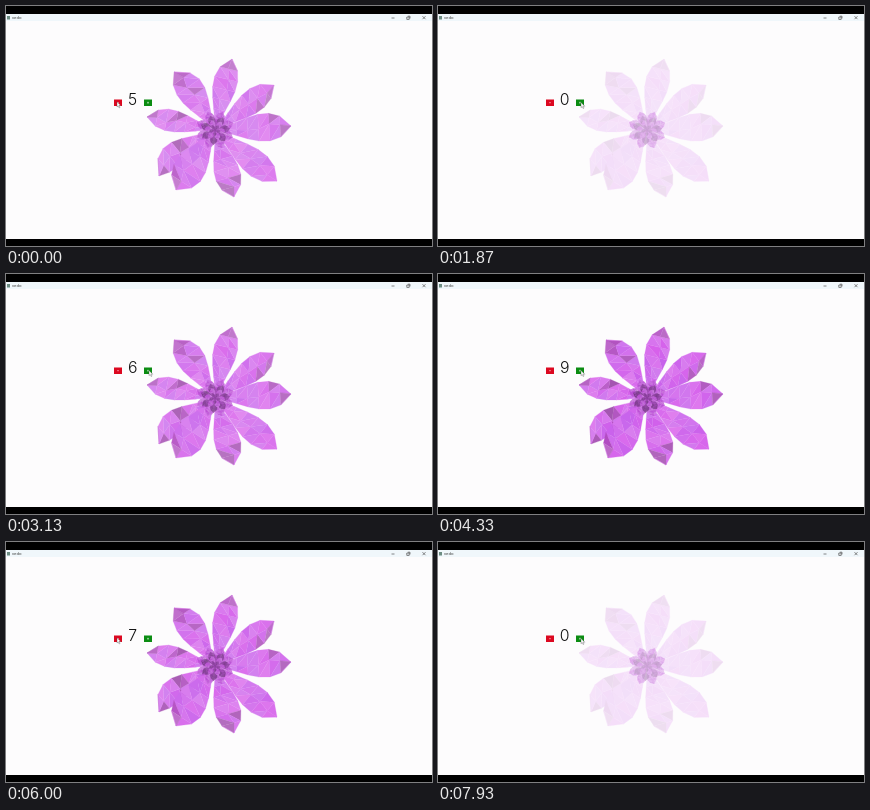
Animation of 426x240 px, one loop 8000 ms. Source, as an HTML page:

```html
<!DOCTYPE html>
<html lang="en">
<head>
<meta charset="utf-8">
<title>Flower opacity</title>
<style>
  html, body { margin: 0; width: 100%; height: 100%; overflow: hidden; background: #000; }
  svg { display: block; width: 100vw; height: 100vh; }
</style>
</head>
<body>
<svg viewBox="0 0 426 240">
  <rect width="426" height="240"/>
  <rect y="8" width="426" height="225" fill="#fdfcfd"/>
  <rect y="8" width="426" height="7" fill="#f0f7fb"/>
  <rect x="1" y="10" width="3" height="3.5" fill="#6d8d83"/>
  <text x="6" y="13.2" font-family="'Open Sans', sans-serif" font-size="4.2" fill="#333">vedo</text>
  <path d="M385.5 12h3M400.8 11h2.4v2.4h-2.4zM401.8 10.2h2.2v2.2M416.5 10.2l3 3m0-3l-3 3" fill="none" stroke="#444" stroke-width=".65"/>

  <g id="petals"></g>
  <g id="core"></g>

  <rect x="108" y="93.5" width="8" height="6.5" fill="#dc0820"/>
  <rect x="138" y="93.5" width="8" height="6.5" fill="#0b8c12"/>
  <path d="M111 96.7h2M141 96.7h2m-1-1v2" stroke="#fff" stroke-width=".6" opacity=".8"/>
  <text id="digit" x="126.7" y="99.2" text-anchor="middle" font-family="Inter, sans-serif" font-weight="300" font-size="15.8" fill="#111"></text>
  <path id="cursor" d="M0 0v5.2l1.2-1.1.9 2 .9-.4-.9-1.9h1.7z" fill="#fff" stroke="#444" stroke-width=".35"/>
</svg>
<script>
const $ = id => document.getElementById(id);
const LOOP = 8000, CX = 209, CY = 124, ROWS = 7;

let seed = 17;
const random = () => (seed = seed * 16807 % 2147483647) / 2147483647;
const between = (a, b) => a + (b - a) * random();
const clamp = (v, lo, hi) => Math.min(hi, Math.max(lo, v));

function polygon(parent, points, fill) {
  const p = document.createElementNS('http://www.w3.org/2000/svg', 'polygon');
  p.setAttribute('points', points.map(q => q.map(v => v.toFixed(2)).join()).join(' '));
  p.setAttribute('fill', fill);
  p.setAttribute('stroke', fill);
  p.setAttribute('stroke-width', .25);
  parent.append(p);
}

// Mostly even pink-violet, with some shaded facets towards the tip.
function petalColor(t) {
  const shaded = random() < .35 * t ** 3;
  return shaded ? `hsl(292 ${between(38, 50)}% ${between(48, 58)}%)`
                : `hsl(${between(284, 292)} 78% ${between(63, 70)}%)`;
}

// Relative half width of a petal: narrow at the base, fullest near two thirds.
const profile = t => Math.max(0, Math.sin(Math.PI * t ** 1.7)) ** .7;

// Faceted petal from the flower's centre to (x, y); bend shifts its middle sideways.
function petal(parent, x, y, halfWidth, bend, color) {
  const dx = x - CX, dy = y - CY, length = Math.hypot(dx, dy);
  const row = i => {
    const t = i / ROWS, w = profile(t);
    return [-1, between(-.3, .3), 1].map(side => {
      const offset = (bend + side * halfWidth) * w / length;
      return [CX + dx * t - dy * offset, CY + dy * t + dx * offset];
    });
  };
  let previous = row(0);
  for (let i = 1; i <= ROWS; i++) {
    const next = row(i);
    for (const s of [0, 1]) {
      const [a, b, c, d] = [previous[s], previous[s + 1], next[s], next[s + 1]];
      polygon(parent, [a, b, c], color(i / ROWS));
      polygon(parent, [b, c, d], color(i / ROWS));
    }
    previous = next;
  }
}

// Tip, half width and bend of each large petal.
const petals = [
  [153, 170, 12, 7], [170, 184, 16, 0], [228, 191, 13, 0],
  [271, 175, 13, 0], [285, 120, 14, 0], [268, 79, 12, 0],
  [226, 53, 12, -1], [168, 66, 14, 3], [141, 111, 11, 1]
];
for (const p of petals) petal($('petals'), ...p, petalColor);

// Nested rings of small petals, alternately light and dark.
for (let k = 0; k < 4; k++) {
  const count = 8 - k, radius = 19 - 4.5 * k;
  for (let i = 0; i < count; i++) {
    const a = .4 * (k + 1) + i * 2 * Math.PI / count;
    petal($('core'), CX + radius * Math.cos(a), CY + radius * Math.sin(a), radius * .24, 0,
      () => `hsl(288 ${k % 2 ? 40 : 60}% ${between(0, 14) + (k % 2 ? 36 : 56)}%)`);
  }
}

// Number of clicks made so far in an evenly spaced run.
const clicks = (t, start, interval, count) =>
  clamp(Math.floor((t - start) / interval) + 1, 0, count);

const ease = (t, from, to) => {
  const k = clamp((t - from) / (to - from), 0, 1);
  return k * k * (3 - 2 * k);
};

function frame(now) {
  const t = now % LOOP;
  const n = 5 - clicks(t, 150, 210, 5) + clicks(t, 1950, 220, 9) - clicks(t, 5650, 212, 9);
  const opacity = 1 - .82 * .75 ** n;
  const side = ease(t, 1150, 1700) - ease(t, 4750, 5350) + ease(t, 7450, 7850);
  $('digit').textContent = n;
  $('petals').setAttribute('opacity', opacity);
  $('core').setAttribute('opacity', .25 + .75 * opacity);
  $('cursor').setAttribute('transform', `translate(${111 + 32 * side} ${95.8 + .6 * side})`);
  requestAnimationFrame(frame);
}
requestAnimationFrame(frame);
</script>
</body>
</html>
```
